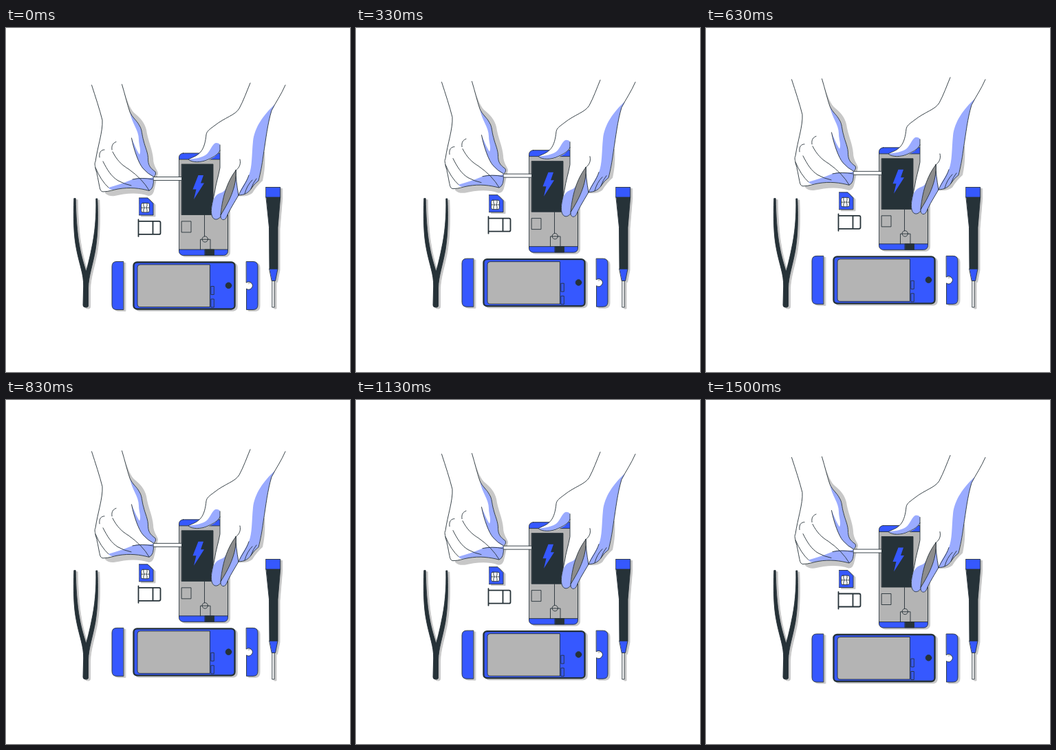
Animation, 500 px wide and 500 px high, one loop 1540 ms. Source, as an HTML page:

```html
<!DOCTYPE html>
<html lang="en">
<head>
<meta charset="utf-8">
<title>Phone repair</title>
<style>
  html, body { margin: 0; width: 100%; height: 100%; overflow: hidden; background: #fff; }
  svg { display: block; width: 100%; height: 100%; }
  path, rect, circle { stroke: #263238; stroke-width: .9; stroke-linejoin: round; stroke-linecap: round; }
  .cast { filter: drop-shadow(3px 2.5px 0 #c7c7c7); }
  .blue { fill: #3658ff; }
  .light { fill: #9aabff; }
  .dark { fill: #263238; }
  .grey { fill: #b4b4b4; }
  .white { fill: #fff; }
  .shade { fill: #c7c7c7; stroke: none; }
  .line { fill: none; }
  .flat { stroke: none; }
</style>
</head>
<body>
<svg viewBox="0 0 500 500">
  <!-- Tweezers -->
  <g class="cast">
    <path class="dark" d="M98.8 248C98 275 98 300 102.5 322C107 345 113 358 112.7 375L112 403Q112 406 116 406Q120 406 119.5 403V378C120 360 126 345 130 322C134 297 133.8 270 132.8 248H130.8C131.5 275 129 300 124.500 320C121 338 118 348 116.500 354C113.500 345 109.500 332 107 318C103 297 101.500 270 101.200 248Z"/>
  </g>

  <!-- Screwdriver -->
  <g class="cast">
    <path class="white" d="M387.2 367h2.8v39h-2.8z"/>
    <path class="blue" d="M383 350h12l-3.5 17.5h-5z"/>
    <path class="dark" d="M378.3 246H398.7L395 290V350H383L382.5 290Z"/>
    <rect class="blue" x="377.7" y="231.5" width="21" height="14.5"/>
  </g>

  <g id="floating">
    <!-- Opened phone -->
    <g class="cast">
      <rect class="blue" x="251.5" y="182" width="71" height="148.5" rx="6"/>
      <path class="grey" d="M251.5 191h71v131h-71z"/>
      <path class="dark" d="M255.5 198H301V271.5H255.5z"/>
      <path class="blue flat" d="M279.500 214h7.500l-4 11.500h5L273 249l3.500-14.500H271.500z"/>
      <path class="line" d="M288.5 272V303M282.5 322V307.3H297V322M255.5 281H269V297H255.5z"/>
      <circle class="line" cx="289.3" cy="307" r="4.2"/>
      <path class="dark" d="M289.3 322H302.5V330.3H289.3z"/>
    </g>

    <!-- SIM card and tray -->
    <g class="cast">
      <path class="blue" d="M193.5 247H206L214 255V272H193.5z"/>
    </g>
    <rect class="white" x="196.5" y="254.5" width="12" height="13.5" rx="2.5"/>
    <path class="line" d="M197 261.300h4.500M208 261.300h-4.500M200 255v3.500l1.500 2.800-1.500 2.700v3.500M205 255v3.500l-1.500 2.800 1.500 2.700v3.500"/>
    <path class="line" style="stroke-width:1.8" d="M192.500 278.500V303M193 281H222.500Q224.500 281 224.500 283V298Q224.500 300 222.500 300H193M213.500 281V300"/>

    <!-- Phone shell and caps -->
    <g class="cast">
      <path class="blue" d="M170.5 339.5H161Q154 339.500 154 346.500V402.500Q154 409.500 161 409.500H170.500Z"/>
      <path class="blue" d="M349.500 339.500H359Q366 339.500 366 346.500V402.500Q366 409.500 359 409.500H349.500V379A5.500 5.500 0 1 0 349.500 370Z"/>
      <rect class="blue" style="stroke-width:2.4" x="185.500" y="340.500" width="147" height="68" rx="5"/>
    </g>
    <path class="grey" d="M296 344H195Q191 344 191 348V401Q191 405.500 195 405.500H296z"/>
    <path class="line" d="M298.300 375.500h4v12h-4zM298.300 394h4v12h-4z"/>
    <circle class="dark" cx="323.500" cy="374.300" r="4.300"/>

    <!-- Left hand with spudger -->
    <path class="shade" d="M172 95C178 110 182 120 187 124C196 131 202 139 204 148C206 163 213 176 214 190C214 200 220 206 221 211L216 233Q214 245 207 244C190 238 172 241 158 244Q149 245 144 240Z"/>
    <path class="white" d="M213 216.500H255.500V221.500H213z"/>
    <path class="white flat" d="M124.500 83C130 100 136 118 140 134C141 150 133 173 130 194C128 198 130 201 130 204C133 213 134 222 136 231Q137 238 141 238C150 238 156 235 163 234C180 231 195 233 208 236.500Q216 233 214 217Q219 213 217 209C212 205 207 202 206.500 192C207 182 202 173 200 164C197 154 198 148 194 142C190 134 184 131 180 122C176 110 173 97 168.500 82Z"/>
    <path class="light flat" d="M180 122C184 131 190 134 194 142C198 148 197 154 200 164C202 173 207 182 206.500 192C207 202 212 205 217 209Q219 213 214 216Q206 212 199 204C193 197 186 178 182.500 160C186 168 190 178 194 184C197 178 193 170 193 162C193 148 183 139 180 122Z"/>
    <path class="light flat" d="M149 232C160 229 172 225 184 220C194 216 206 220 214 217Q216 233 208 236.500C195 233 180 231 163 234Q151 237 149 232Z"/>
    <path class="line" d="M124.500 83C130 100 136 118 140 134C141 150 133 173 130 194C128 198 130 201 130 204C133 213 134 222 136 231Q137 238 141 238C150 238 156 235 163 234C180 231 195 233 208 236.500Q216 233 214 217Q219 213 217 209C212 205 207 202 206.500 192C207 182 202 173 200 164C197 154 198 148 194 142C190 134 184 131 180 122C176 110 173 97 168.500 82"/>
    <path class="line" d="M182.500 160C186 178 193 197 199 204Q206 212 214 216M130 203Q138 222 149 232M141 194C147 206 153 216 163 222Q172 227 182 229M155 180C161 192 168 199 178 205Q198 219 208 236M184 220Q198 217 213 220M136 188C135 181 138 177 143 177M154 177C153 170 156 167 160 165.500"/>

    <!-- Right hand -->
    <path class="shade" d="M376 180C377 195 376 208 373 222Q364 230 358 240Q350 246 336 244L360 180Z"/>
    <path class="white flat" d="M355 80C350 92 345 106 339 117C333 127 318 130 303 142C295 148 292 150 291 155C290 165 288 174 283 180C277 187 270 188 265 191C270 196 284 196 294 192C303 188 308 184 311 178V203C309 215 305 226 303 240C300 255 297 263 299 272C301 280 308 280 312 274C312 280 317 281 320 276C325 264 333 252 338 243C346 243 352 240 356 234Q361 226 367 222C370 210 372 200 374 185C378 160 380 140 386 120C392 108 400 97 406 83Z"/>
    <path class="light flat" d="M265 191C276 190 285 188 291 184C298 178 299 169 305 167Q310 167 311 170V178C308 184 303 187 294 191C284 196 270 196 265 191Z"/>
    <path class="light flat" d="M391 111C374 126 361 145 359 165C357 185 358 202 353 214C349 224 342 231 338 243C346 243 352 240 356 234Q361 226 367 222C370 210 372 200 374 185C378 160 380 140 386 120Z"/>
    <path class="light flat" d="M299 272C297 256 301 244 311 240Q319 238 323 228C316 245 312 262 312 274C308 280 301 280 299 272Z"/>
    <path class="light" d="M334 207C335 222 320 253 312 272C311 279 317 281 320 276C325 264 333 252 338 243Q334 222 334 207Z"/>
    <path fill="#8d8d8d" d="M334 207C324 220 315 240 312 272C322 256 336 232 334 207Z"/>
    <path class="line" d="M355 80C350 92 345 106 339 117C333 127 318 130 303 142C295 148 292 150 291 155C290 165 288 174 283 180C277 187 270 188 265 191C270 196 284 196 294 191C303 187 308 184 311 178M311 170V203C309 215 305 226 303 240C300 255 297 263 299 272C301 280 308 280 312 274M338 243C346 243 352 240 356 234Q361 226 367 222C370 210 372 200 374 185C378 160 380 140 386 120C392 108 400 97 406 83M340 191C342 199 338 204 334 207M338 243C343 232 349 226 353 214M347 241Q350 229 358 221M356 234Q359 225 364 219"/>
  </g>
</svg>
<script>
  const LOOP = 1540, STEPS = 37, RISE = 10, REST = 0.5;
  const floating = document.getElementById('floating');
  const start = performance.now();

  // Linear bob up and down, drawn at 24 pictures a second.
  function draw() {
    const time = (performance.now() - start) % LOOP;
    const step = (Math.floor(time * STEPS / LOOP + 0.2) + 1) % STEPS;
    const lift = RISE * (1 - Math.abs(2 * step / STEPS - 1));
    floating.setAttribute('transform', `translate(0 ${REST - lift})`);
    requestAnimationFrame(draw);
  }
  draw();
</script>
</body>
</html>
```
